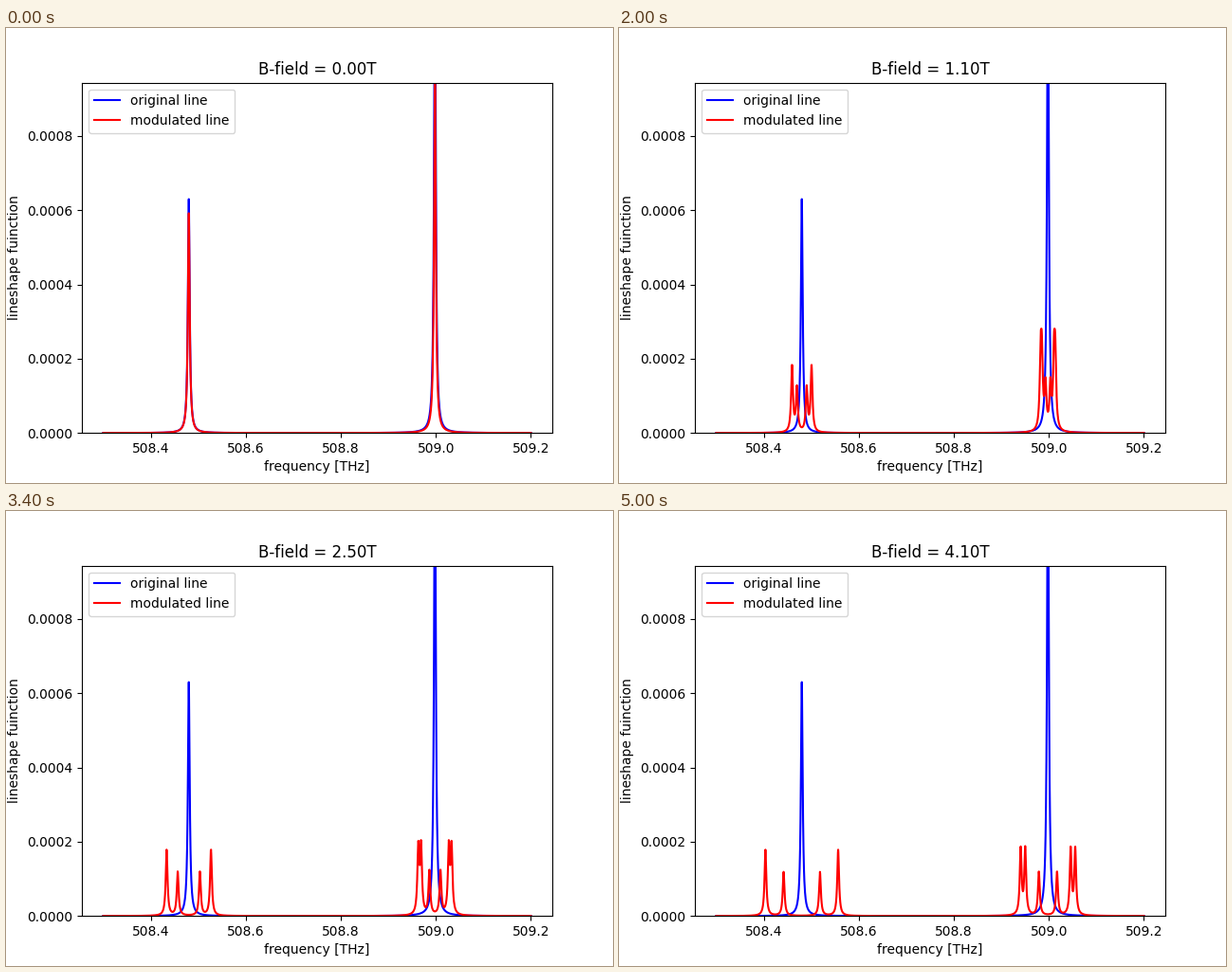
Recreate the animation shown at these times as a matplotlib script. Size 640x480 px, loop 5200 ms.

```python
import numpy as np
import matplotlib.pyplot as plt
from matplotlib.animation import FuncAnimation

HWHM = 0.00227          # THz
ZEEMAN = 0.013996       # THz per tesla
D1, D2 = 508.48, 508.998
PEAK = 0.00063
STRONG, WEAK = 0.000178, 0.000118

# (line centre, shift in Bohr magnetons, height) of each split pair
PAIRS = [
    (D1, 4 / 3, STRONG),
    (D1, 2 / 3, WEAK),
    (D2, 1, STRONG),
    (D2, 5 / 6, STRONG),
    (D2, 1 / 3, WEAK),
]

# The field sweep gets coarser in three stages
fields = np.concatenate([
    0.05 * np.arange(4),
    0.2 + 0.1 * np.arange(3),
    0.5 + 0.2 * np.arange(19),
])
freq = np.linspace(508.3, 509.2, 2001)


def lorentz(centre, height):
    return height * HWHM**2 / ((freq - centre)**2 + HWHM**2)


def split_lines(field):
    total = np.zeros_like(freq)
    for centre, shift, height in PAIRS:
        offset = shift * ZEEMAN * field
        total += lorentz(centre - offset, height)
        total += lorentz(centre + offset, height)
    return total


fig, ax = plt.subplots(figsize=(6.4, 4.8), dpi=100)
ax.plot(freq, lorentz(D1, PEAK) + lorentz(D2, 2 * PEAK),
        color="blue", label="original line")
modulated, = ax.plot(freq, split_lines(0), color="red",
                     label="modulated line")
ax.set_ylim(0, 0.000944)
ax.set_xlabel("frequency [THz]")
ax.set_ylabel("lineshape fuinction")
ax.legend(loc="upper left")
title = ax.set_title("B-field = 0.00T")


def update(i):
    modulated.set_ydata(split_lines(fields[i]))
    title.set_text(f"B-field = {fields[i]:.2f}T")
    return modulated, title


anim = FuncAnimation(fig, update, frames=len(fields), interval=200,
                     repeat=True, repeat_delay=0, blit=False)
plt.show()
```
